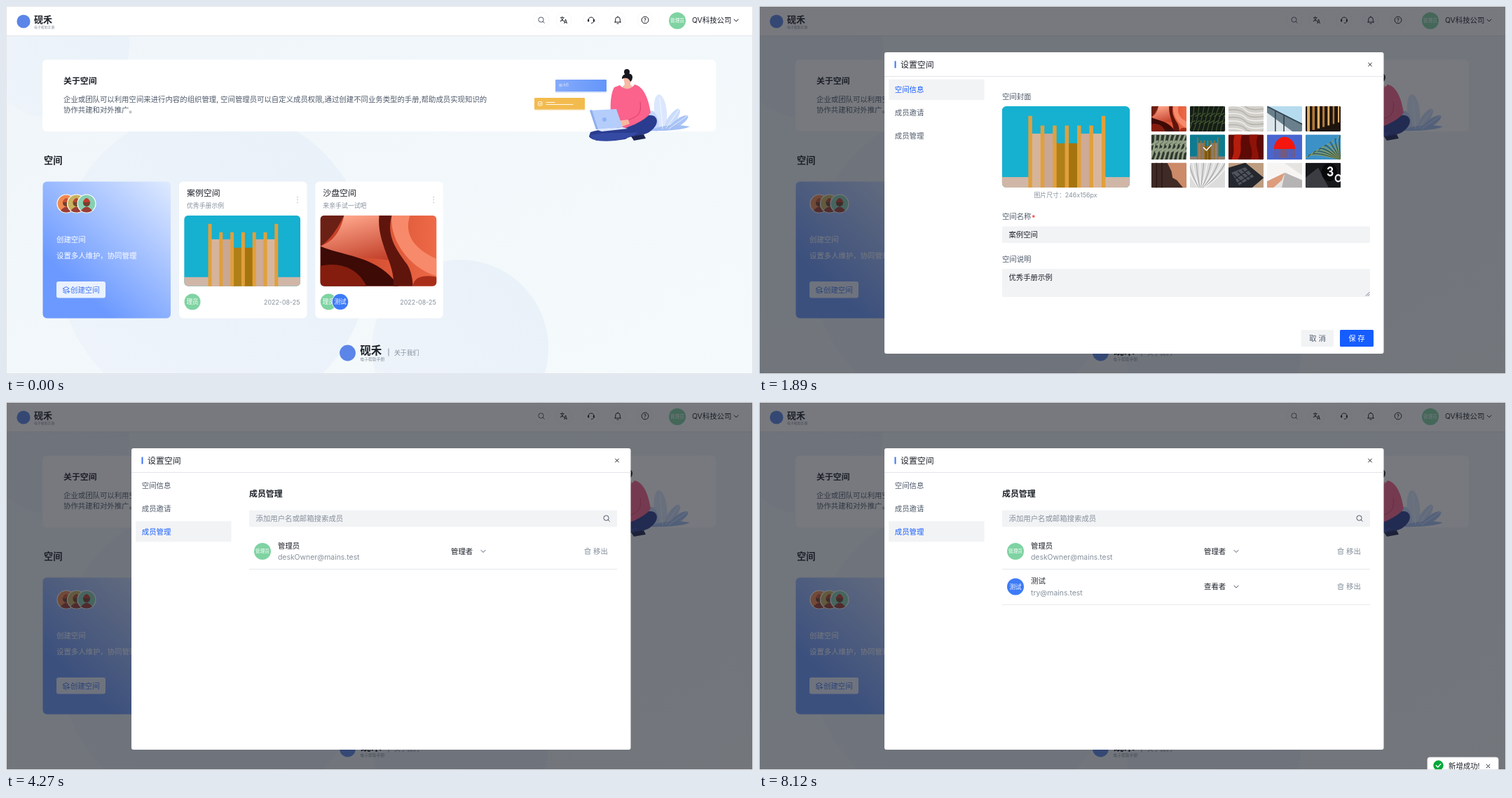
An HTML page that plays this animation: 1066 px wide and 525 px high, repeating every 8.4 s.

```html
<!DOCTYPE html>
<html lang="zh-CN">
<head>
<meta charset="utf-8">
<title>设置空间</title>
<style>
  html, body { margin: 0; height: 100%; overflow: hidden; background: #fff; }
  svg { display: block; font-family: Inter, "Noto Sans CJK SC", "Noto Sans CJK", sans-serif; }
  text { white-space: pre; }
  #typed { font-family: "Liberation Sans", "Noto Sans CJK SC", sans-serif; text-decoration: underline; }
</style>
</head>
<body>
<svg id="stage" width="1066" height="525" viewBox="0 0 1066 525"></svg>
<script>
const INK = '#1d2129', TEXT = '#4e5969', MUTED = '#86909c', LINE = '#e5e6eb', FILL = '#f2f3f5',
      BLUE = '#165dff', GREEN = '#7fd3a2', AVATAR_BLUE = '#3d7bf7';
const LOOP = 8400, STEP = 70;

// Drawing helpers; text is placed by the vertical centre of its characters.
const rep = (n, f) => Array.from({ length: n }, (_, i) => f(i)).join('');
const rect = (x, y, w, h, fill, r = 0, more = '') =>
  `<rect x="${x}" y="${y}" width="${w}" height="${h}" rx="${r}" fill="${fill}" ${more}/>`;
const circle = (x, y, r, fill, more = '') => `<circle cx="${x}" cy="${y}" r="${r}" fill="${fill}" ${more}/>`;
const ellipse = (x, y, rx, ry, fill, turn = 0) =>
  `<ellipse cx="${x}" cy="${y}" rx="${rx}" ry="${ry}" fill="${fill}" transform="rotate(${turn} ${x} ${y})"/>`;
const path = (d, fill) => `<path d="${d}" fill="${fill}"/>`;
const line = (d, color = INK, w = 1) =>
  `<path d="${d}" fill="none" stroke="${color}" stroke-width="${w}" stroke-linecap="round" stroke-linejoin="round"/>`;
const text = (x, y, size, str, fill = INK, more = '') =>
  `<text x="${x}" y="${y + size * .37}" font-size="${size}" fill="${fill}" ${more}>${str}</text>`;
const group = (id, content) => `<g id="${id}">${content}</g>`;
const at = (x, y, content) => `<g transform="translate(${x} ${y})">${content}</g>`;
const MID = 'text-anchor="middle"', END = 'text-anchor="end"', SEMI = 'font-weight="600"', MEDIUM = 'font-weight="500"';

const avatar = (x, y, r, fill, label, size) =>
  circle(x, y, r, fill) + text(x, y, size, label, '#fff', MID + ' ' + MEDIUM);
const picture = (x, y, w, h, art) =>
  `<svg x="${x}" y="${y}" width="${w}" height="${h}" viewBox="0 0 166 101" preserveAspectRatio="none">
   <g clip-path="url(#rounded)">${art}</g></svg>`;
const searchIcon = (x, y) => at(x, y, circle(-.5, -.5, 3.6, 'none', `stroke="${TEXT}"`) + line('M2.3 2.3 4.3 4.3', TEXT));
const chevron = (x, y, color) => at(x, y, line('M-3-1.5 0 1.5 3-1.5', color));
const cross = (x, y) => at(x, y, line('M-2.4-2.4 2.4 2.4M2.4-2.4-2.4 2.4'));
const trash = (x, y, color) => at(x, y, line('M-4-2.5H4M-1.5-4.2H1.5M-3-2.5V4H3V-2.5M-1-.3V2M1-.3V2', color, .9));

// Pictures on a 166 x 101 field.
const back = fill => rect(0, 0, 166, 101, fill);
const bodies = ['#d6b49b', '#c9a795', '#b07f18', '#a6740f', '#cdab96', '#d8b69e'];
const spineX = i => 34.3 + i * 15.8;
const books = back('#16b0d0') + rect(0, 88, 166, 13, '#d0b6a6') +
  bodies.map((c, i) => rect(spineX(i) + 3, i === 2 || i === 3 ? 46 : 34, 14, 70, c)).join('') +
  rep(7, i => rect(spineX(i), i % 6 ? 24 : 12, 5, 90, '#e0a03c'));
const canyon = back('url(#rock)') +
  path('M0 0H34C22 24 12 36 0 44Z', '#6b2015') +
  path('M34 0H92C88 26 98 44 110 66 78 58 46 66 0 44 22 36 30 18 34 0Z', 'url(#glow)') +
  path('M0 44C40 60 82 58 112 101H0Z', '#3d0a06') +
  path('M0 72C30 66 54 76 66 101H0Z', '#841d0e') +
  path('M84 0H102C94 30 108 48 124 70 130 80 132 92 132 101H104C108 70 80 40 84 0Z', '#5f150c') +
  path('M102 0H128C120 24 130 46 166 62V86C132 78 98 38 102 0Z', '#f78a6a') +
  path('M132 101C134 88 146 84 166 88V101Z', '#a92e1a');
const leaves = (bg, color, w) => back(bg) +
  rep(9, i => line(`M${i * 22 - 10} 110Q${i * 18 + 20} 60 ${i * 24 + 20}-5M${i * 22} 70l24-12M${i * 22 + 5} 40l24-12`, color, w));
const arts = [
  canyon,
  leaves('#151d15', '#40532f', 4),
  back('#d2d0cb') + rep(9, i => line(`M-5 ${i * 15 - 15}Q60 ${i * 15 - 20} 80 ${i * 15}T171 ${i * 15 + 10}`, i % 2 ? '#f2f1ee' : '#b3b0a9', 4)),
  back('#b5dcee') + path('M0 0 166 72V101H0Z', '#69808c') + path('M0 25 120 101H0Z', '#dce6ea') + line('M0 0 166 72M40 20V101M80 38V101', '#30414c', 5),
  back('#1d140e') + rep(7, i => rect(8 + i * 24, 0, 13 - i, 101 - i * 6, i % 2 ? '#b47a36' : '#deb06a')),
  leaves('#30382f', '#93a086', 9),
  books + rect(0, 0, 166, 101, '#000', 0, 'opacity=".3"'),
  back('#5d0905') + path('M30 0H65C48 40 72 60 45 101H15C38 60 15 40 30 0Z', '#b51d0c') + path('M100 0H140C118 50 150 70 140 101H105C125 60 90 40 100 0Z', '#8e1208'),
  back('#4866d0') + circle(83, 60, 50, '#f5160d') + rect(0, 58, 166, 43, '#4866d0') + rep(9, i => rect(36 + i * 11, 58, 7, 36, '#75587b')),
  back('#3c91c7') + rep(14, i => line(`M166 101Q${20 + i * 10} ${65 - i * 5} ${i * 13} ${95 - i * 7}`, i % 2 ? '#3c5742' : '#8b9b62', 4)),
  back('#3f2a26') + path('M75 0H166V101H150L120 70 100 60 95 35Z', '#cc8a68') + line('M25 0V101M50 0V101', '#2a1a18', 5),
  back('#dcdcdc') + rep(13, i => line(`M50 110Q${i * 12} 60 ${i * 17 - 20} 0`, i % 2 ? '#a9a9a9' : '#f7f7f7', 4)),
  back('#bd9d82') + path('M0 20 80 0 166 60 110 101H0Z', '#24272d') + path('M15 40 80 18 120 55 50 90Z', '#4e535c') +
    line('M25 47 70 83M45 36 90 70M65 28 105 62M30 65 95 28M45 80 110 45', '#20232a', 4),
  back('#e6e4e3') + path('M0 0H80L166 50V70L85 40 0 75Z', '#f7f5f3') + path('M85 40 166 70V101H70Z', '#b6b3b5') + path('M0 75 85 40 70 70 30 101H0Z', '#dd9c7c'),
  back('#17181b') + path('M0 60 60 20 110 101H0Z', '#3b3d42') + circle(112, 38, 36, '#08090a') +
    text(116, 36, 52, '3', '#fff', MID + ' font-weight="700"') + circle(154, 62, 13, 'none', 'stroke="#eee" stroke-width="7"')
];

const brand = (x, y, k) =>
  circle(x, y, 9.6 * k, '#5b85e8') +
  text(x + 15 * k, y - 2.8 * k, 13 * k, '砚禾', INK, 'font-weight="700"') +
  text(x + 15 * k, y + 7.7 * k, 4.9 * k, '电子帮助手册', MUTED);

const header = rect(0, 0, 1066, 42, '#fff') + rect(0, 42, 1066, 1, LINE) + brand(25, 22, 1) +
  [764, 796, 835, 873, 912].map(x => circle(x, 20, 11, '#fff', `stroke="#f7f8fa"`)).join('') +
  searchIcon(764, 20) +
  text(790.5, 18.5, 6.5, '文', INK, SEMI) + text(796, 22, 7, 'A', INK, SEMI) +
  at(835, 20, line('M-4 1A4.1 4.1 0 1 1 4 1C4 3.3 2.4 4.4 .3 4.4') + rect(-5, -1, 2.2, 3.4, INK, 1) + rect(2.8, -1, 2.2, 3.4, INK, 1)) +
  at(873, 20, line('M-4.5 3H4.5M-3.3 3V-1A3.3 3.3 0 0 1 3.3-1V3M-1 5H1M0-5V-4')) +
  circle(912, 20, 4.9, 'none', `stroke="${INK}"`) + text(912, 20, 7, '?', INK, MID + ' ' + SEMI) +
  avatar(958, 21, 12, GREEN, '管理员', 6.6) + text(979, 20.5, 10.4, 'QV科技公司') + chevron(1042, 20.5, INK);

const woman =
  rect(784, 107, 73, 17, '#d9e4fb', 1) + rect(784, 105, 73, 17, 'url(#panel)', 1) +
  text(789, 113, 6, '⊞ H1', '#eaf1ff') +
  rect(754, 133, 72, 16, '#f8e7c6', 1) + rect(754, 131, 72, 16.5, '#f3bb4e', 1) +
  rect(759.5, 136.5, 5.5, 5.5, 'none', 1, 'stroke="#fff" stroke-width=".8"') +
  line('M761 139 762 140.3 764 138M771 137.5H783M771 140.5H809', '#fff', .9) +
  ellipse(934, 151, 9, 25, '#dbe7fd', -6) + ellipse(951, 161, 6, 17, '#cbdcfb', 35) +
  ellipse(960, 166, 5, 16, '#a9c4f6', 55) + ellipse(925, 164, 6, 15, '#c3d7fb', -15) +
  path('M915 178Q945 166 976 172Q960 179 915 178Z', '#a2bff4') +
  line('M937 175 933 131M942 174 961 147M946 175 972 157', '#fff', .7) +
  path('M881 102H892L891 112 897 118H877L883 112Z', '#f6b9a3') +
  circle(886, 94, 4, '#17171f') + path('M879 104C878 96 893 93 894 101 894 106 891 110 890 106 887 102 884 102 879 104Z', '#17171f') +
  path('M834 180C846 175 868 176 884 170 900 160 914 153 925 157 933 163 928 174 916 181 906 186 892 184 884 190 862 194 836 194 832 186Z', '#2a3c8f') +
  path('M833 185C856 178 880 183 902 180 896 187 870 194 842 192Z', '#344aa3') +
  path('M892 186 910 183 913 189 896 192Z', '#1c2452') +
  path('M876 113C882 120 892 120 897 112 911 115 917 134 920 152 914 162 896 170 884 174 868 175 862 170 864 156 862 148 862 126 868 116 876 113Z', '#fb628c') +
  line('M905 137C907 150 905 158 886 163', '#df4672', 1.2) +
  path('M872 164 888 162 890 168 876 173Z', '#f6b9a3') +
  path('M833 149 871 147 880 173 842 176Z', '#b4cdfb') + path('M833 149 836 148 845 176 842 176Z', '#8fb0f0') +
  path('M842 176 880 173 887 175 850 179Z', '#dce8ff') + circle(854, 162, 3, '#8db4f5');

const person = (x, fill, hat) =>
  circle(x, 282, 13, fill, 'stroke="#fff" stroke-width="1.2"') +
  path(`M${x - 8} 292Q${x} 281 ${x + 8} 292Q${x} 297 ${x - 8} 292Z`, '#9b3d36') +
  circle(x, 281, 5, '#72412f') + path(`M${x - 5.5} 280Q${x} 268 ${x + 5.5} 280Z`, hat);

const spaceCard = (x, title, note, art) =>
  rect(x, 250.5, 182.5, 195, '#fff', 6) + text(x + 11, 267, 11.9, title) + text(x + 11, 285, 8.9, note, MUTED) +
  rep(3, i => circle(x + 169, 272.5 + i * 4, .8, '#b4b9c2')) + picture(x + 7.2, 298.8, 166, 101, art) +
  avatar(x + 19, 422, 11.5, GREEN, '理员', 8.6) + text(x + 172.5, 423, 8.9, '2022-08-25', MUTED, END);

const home = rect(0, 0, 1066, 525, 'url(#page)') +
  circle(70, 55, 106, 'url(#bubble)') + circle(296, 366, 222, 'url(#bubble)') + circle(648, 488, 126, 'url(#bubble)') +
  header + rect(52, 76.5, 961, 102.5, '#fff', 6) +
  text(82, 107, 11.9, '关于空间', INK, SEMI) +
  text(82, 133.5, 10.4, '企业或团队可以利用空间来进行内容的组织管理, 空间管理员可以自定义成员权限,通过创建不同业务类型的手册,帮助成员实现知识的', TEXT) +
  text(82, 148.5, 10.4, '协作共建和对外推广。', TEXT) + woman +
  text(54, 220.5, 13.2, '空间', INK, SEMI) +
  rect(52.5, 250.5, 182.5, 195, 'url(#create)', 6) +
  person(86, '#f08a52', '#c8502f') + person(100.5, '#c8b25f', '#b8452f') + person(115, '#88cfb2', '#c23b2e') +
  text(72, 333.5, 10.4, '创建空间', '#fff') + text(72, 356.5, 10.4, '设置多人维护，协同管理', '#fff') +
  rect(72, 393, 70, 23.5, '#eaf1ff', 3) +
  at(86, 405, line('M-4.5-2 0-4.5 4-2 0 .3ZM-4.5.5 0 3M-4.5 3 0 5M3 .5V4.5M1 2.5H5', '#3f76f0')) +
  text(92, 405, 10.4, '创建空间', '#3f76f0') +
  spaceCard(247, '案例空间', '优秀手册示例', books) + spaceCard(441.3, '沙盘空间', '来亲手试一试吧', canyon) +
  circle(477, 422, 12, '#fff') + avatar(477, 422, 11.3, AVATAR_BLUE, '测试', 8.6) +
  brand(487.5, 495, 1.19) + rect(545.5, 488.5, 1, 11, MUTED) + text(554, 494.5, 8.9, '关于我们', MUTED);

const menu = rect(364.5, 287.5, 54.5, 60.5, '#fff', 3, `stroke="${LINE}" filter="url(#shadow)"`) +
  rect(365, 291, 53.5, 26.5, FILL, 0, 'id="menuHover"') +
  at(379, 304, line('M0-4.6 4-2.3V2.3L0 4.6-4 2.3V-2.3Z') + circle(0, 0, 1.6, 'none', `stroke="${INK}"`)) +
  text(387, 304, 10.4, '设置') + trash(379, 331, INK) + text(387, 331, 10.4, '删除');

const info = text(347, 129, 10.4, '空间封面', TEXT) + picture(346.5, 143, 183, 116, books) +
  text(437.5, 270, 8.9, '图片尺寸：246x156px', MUTED, MID) +
  arts.map((art, i) => picture(559.7 + i % 5 * 55, 143 + Math.floor(i / 5) * 40.3, 50.6, 36, art)).join('') +
  line('M634.5 202 638.5 206 645.5 198.5', '#fff', 1.5) +
  text(347, 300.5, 10.4, '空间名称', TEXT) + text(389, 302.5, 10.4, '*', '#f53f3f', SEMI) +
  rect(347, 314.5, 525, 23.5, FILL, 1) + text(356.5, 326.5, 10.4, '案例空间') +
  text(347, 361.5, 10.4, '空间说明', TEXT) +
  rect(347, 375, 525, 40, FILL, 1) + text(356.5, 387.5, 10.4, '优秀手册示例') +
  line('M866 413.5 871 408.5M869 413.5 871 411.5', TEXT, .8) +
  rect(773.5, 462, 46.5, 24, FILL, 1.5) + text(797, 474, 10.4, '取 消', TEXT, MID) +
  rect(829, 462, 48, 24, BLUE, 1.5) + text(853, 474, 10.4, '保 存', '#fff', MID + ' ' + MEDIUM);

const member = (y, color, tag, size, name, mail, role) =>
  avatar(366, y, 12, color, tag, size) + text(388, y - 8, 10.4, name) + text(388, y + 8.5, 10.4, mail, MUTED) +
  text(635, y, 10.4, role) + chevron(681, y, TEXT) + trash(830, y, MUTED) + text(838, y, 10.4, '移出', MUTED) +
  rect(347, y + 25, 525, 1, LINE);

const members = text(347, 130.5, 11.9, '成员管理', INK, SEMI) +
  rect(347, 154.5, 525, 23.5, FILL, 1, 'id="field"') +
  text(356.5, 166.5, 10.4, '添加用户名或邮箱搜索成员', MUTED, 'id="hint"') +
  text(356.5, 166.5, 10.4, '', INK, 'id="typed"') + rect(0, 160, 1, 13, INK, 0, 'id="caret"') + searchIcon(857, 166) +
  member(213, GREEN, '管理员', 6.6, '管理员', 'deskOwner@mains.test', '管理者') +
  group('added', member(263.5, AVATAR_BLUE, '测试', 8.6, '测试', 'try@mains.test', '查看者'));

const modal = rect(179, 66, 712.5, 430, '#fff', 3) + rect(193.5, 78.5, 2, 10, '#3b74f5') +
  text(202, 83.5, 11.9, '设置空间', INK, MEDIUM) + cross(872, 83.5) + rect(179, 100, 712.5, 1, LINE) +
  ['空间信息', '成员邀请', '成员管理'].map((name, i) =>
    rect(185, 104.5 + i * 32.7, 136.5, 29.5, FILL, 1, `id="navBox${i}"`) +
    text(193.8, 119.3 + i * 32.7, 10.4, name, TEXT, `id="nav${i}"`)).join('') +
  group('info', info) + group('members', members);

const toast = rect(954, 507, 101, 30, '#fff', 3, `stroke="${LINE}" filter="url(#shadow)"`) +
  circle(969.5, 518.5, 7.2, '#00a83a') + line('M966.3 518.5 968.7 521 972.8 516.5', '#fff', 1.4) +
  text(984, 519, 10.4, '新增成功!') + cross(1040.5, 519.5);

const gradient = (id, from, to, dir) =>
  `<linearGradient id="${id}" ${dir}><stop stop-color="${from}"/><stop offset="1" stop-color="${to}"/></linearGradient>`;
const $ = id => document.getElementById(id);
$('stage').innerHTML = `<defs>
  <clipPath id="rounded"><rect width="166" height="101" rx="6"/></clipPath>
  <filter id="shadow"><feDropShadow dx="0" dy="1.5" stdDeviation="2" flood-opacity=".12"/></filter>
  ${gradient('page', '#f0f5fa', '#f5fafc', 'x2="1" y2="1"')}
  ${gradient('bubble', '#e9f1f9', '#eef4fa', 'x1="1" x2="0" y2="1"')}
  ${gradient('create', '#6b99ff', '#dfeaff', 'x1=".3" y1=".8" x2="1" y2="0"')}
  ${gradient('panel', '#86abfb', '#6396fa', '')}
  ${gradient('rock', '#c23b22', '#ee6a47', '')}
  ${gradient('glow', '#ffa78c', '#c2402a', 'x1=".3" x2=".7" y2="1"')}</defs>` +
  home + group('menu', menu) + rect(0, 0, 1066, 525, 'rgb(29,33,41)', 0, 'id="mask"') +
  group('modal', modal) + group('toast', toast) + rect(.5, .5, 1065, 524, 'none', 0, 'stroke="#e2e4e7"');

const ramp = (t, from, to) => Math.min(1, Math.max(0, (t - from) / (to - from)));
const show = (id, on) => $(id).setAttribute('display', on ? 'inline' : 'none');
const set = (id, name, value) => $(id).setAttribute(name, value);

// cubic-bezier(.3, 1.3, .3, 1): a slight overshoot.
function spring(x) {
  let lo = 0, hi = 1;
  for (let i = 0; i < 24; i++) {
    const s = (lo + hi) / 2;
    if (.9 * s * (1 - s) + s ** 3 < x) lo = s; else hi = s;
  }
  return 3.9 * (1 - lo) ** 2 * lo + 3 * (1 - lo) * lo * lo + lo ** 3;
}

const typing = [[4900, 'c'], [5110, 'ce'], [5530, 'ce s'], [5810, 'ce sh'], [6020, 'ce shi'], [6230, '测试'], [6720, '']];

function render(t) {
  const open = ramp(t, 1370, 1480);
  set('menu', 'opacity', open * (1 - ramp(t, 1742, 1880)));
  set('menu', 'transform', `translate(0 ${287 * .1 * (1 - open)}) scale(1 ${.9 + .1 * open})`);
  show('menuHover', t >= 1600);

  const pop = spring(ramp(t, 1742, 2142)), size = .5 + .5 * pop;
  set('mask', 'opacity', .6 * Math.min(1, pop));
  set('modal', 'opacity', Math.min(1, pop));
  set('modal', 'transform', `translate(535 281) scale(${size}) translate(-535 -281)`);
  show('modal', t >= 1742);

  const page = t < 3430 ? 0 : 2;
  const hover = t < 3150 || page ? -1 : t < 3290 ? 1 : 2;
  for (let i = 0; i < 3; i++) {
    show('navBox' + i, i === page || i === hover);
    set('nav' + i, 'fill', i === page ? BLUE : TEXT);
    set('nav' + i, 'font-weight', i === page ? 500 : 400);
  }
  show('info', !page);
  show('members', page);

  const focus = t >= 4340 && t < 6720;
  const typed = typing.filter(([start]) => t >= start).pop()?.[1] ?? '';
  set('field', 'fill', focus ? '#fff' : FILL);
  set('field', 'stroke', focus ? '#3f6fc4' : 'none');
  $('typed').textContent = typed;
  show('hint', !typed);
  show('caret', focus);
  set('caret', 'x', 356.5 + (page && typed ? $('typed').getComputedTextLength() : 0));

  show('added', t >= 6720);
  show('toast', t >= 6790);
  set('toast', 'transform', `translate(${112 * (1 - spring(ramp(t, 6780, 7180)))} 0)`);
}

function tick() {
  render(Math.floor(performance.now() % LOOP / STEP) * STEP);
  requestAnimationFrame(tick);
}
tick();
</script>
</body>
</html>
```
